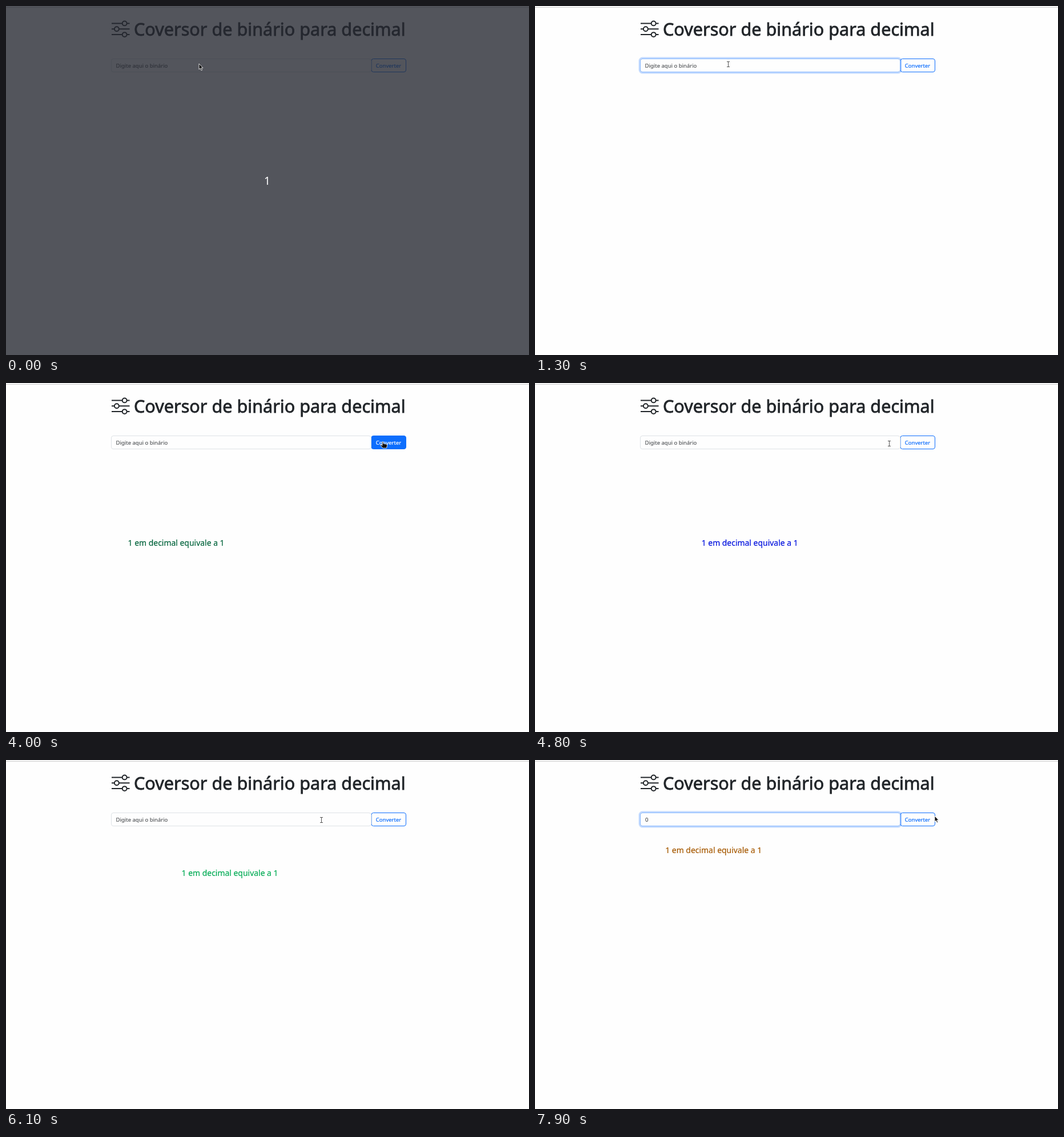
Recreate the animation shown at these times as an HTML page. Size 916 px wide and 611 px high, loop 8 s.

```html
<!DOCTYPE html>
<html lang="pt">
<head>
<meta charset="utf-8">
<title>Coversor</title>
<style>
  html, body { margin: 0; width: 100%; height: 100%; overflow: hidden; background: #fefefe; }
  svg { display: block; width: 916px; height: 611px; }
  text { font: 9.5px "Noto Sans", sans-serif; fill: #212529; stroke-width: .2px; }
  #heading { font-size: 30.6px; stroke: #212529; stroke-width: .8px; }
  #hint { fill: #595c5f; stroke: #595c5f; }
  #button { stroke: #0d6efd; }
  #result { font-size: 13.95px; }
  #count { font-size: 19px; fill: #fff; }
  .icon { fill: none; stroke: #212529; }
  .pointer { fill: #111; stroke: #fff; stroke-width: .8; stroke-linejoin: round; }
</style>
</head>
<body>
<svg viewBox="0 0 916 611">
  <rect width="916" height="611" fill="#fefefe"/>
  <rect width="916" height="2" fill="#f8f8f8"/>
  <rect y="2" width="916" height="1" fill="#d2d2d2"/>

  <g class="icon" transform="translate(185 23.5) scale(1.97)">
    <circle cx="11.5" cy="3.5" r="2"/>
    <circle cx="4.5" cy="8.5" r="2"/>
    <circle cx="11.5" cy="13.5" r="2"/>
    <path d="M0 3.5H9.5M13.5 3.5H16M0 8.5H2.5M6.5 8.5H16M0 13.5H9.5M13.5 13.5H16"/>
  </g>
  <text id="heading" x="224" y="52">Coversor de binário para decimal</text>

  <g id="button">
    <rect x="640" y="92.5" width="60.5" height="23" rx="3.5"/>
    <text x="670" y="107.6" text-anchor="middle">Converter</text>
  </g>

  <rect x="184.5" y="92.5" width="455" height="23" rx="3.5" fill="#fefefe" stroke="#dee2e6"/>
  <g id="focus" fill="none">
    <rect x="182.8" y="90.8" width="458.4" height="26.4" rx="5.2" stroke="#0d6efd" stroke-opacity=".25" stroke-width="2.4"/>
    <rect x="184.5" y="92.5" width="455" height="23" rx="3.5" stroke="#86b7fe"/>
  </g>
  <text id="hint" x="192.6" y="107.6">Digite aqui o binário</text>
  <text id="value" x="193" y="107.6"></text>
  <rect id="caret" y="98" width="1" height="12" fill="#212529"/>

  <text id="result">1 em decimal equivale a 1</text>

  <g id="overlay">
    <rect width="916" height="611" fill="#252831" fill-opacity=".79"/>
    <text id="count" x="457.5" y="312.5" text-anchor="middle">1</text>
  </g>

  <g id="cursor">
    <path id="arrow" class="pointer" d="M0 0V10L2.3 8L4 11.8L5.7 11L4 7.4H7Z"/>
    <path id="beam" d="M-2 -4.5H3M.5 -4.5V4.5M-2 4.5H3" fill="none" stroke="#555"/>
    <path id="hand" class="pointer" d="M-1 0Q0 -1 1 0V3L6.5 4.2Q8 5 7.5 7L6.5 11H0L-3.8 6.5Q-4 5 -2.5 5.2L-1 6.5Z"/>
  </g>
</svg>
<script>
const LOOP = 8000, STEP = 100;
const el = id => document.getElementById(id);
const show = (id, on) => el(id).setAttribute('visibility', on ? 'visible' : 'hidden');
const ramp = (t, from, to) => Math.min(1, Math.max(0, (t - from) / (to - from)));
const mix = (a, b, p) => a.map((v, i) => v + (b[i] - v) * p);
const within = (t, spans) => spans.some(([from, to]) => t >= from && t < to);

// time, x, y
const cursorPath = [
  [0, 338, 101], [100, 338, 102], [1900, 338, 102], [2200, 343, 103], [2600, 363, 111],
  [3000, 437, 128], [3300, 520, 140], [3700, 640, 112], [3900, 660, 103], [4400, 660, 103],
  [4800, 620, 106], [5700, 552, 105], [7000, 552, 105], [7200, 620, 122], [7500, 735, 122],
  [7800, 712, 100], [7900, 700, 98], [8000, 700, 98]
];
const caretSpans = [[700, 1300], [1900, 2400], [2500, 3100], [6400, 6900], [7100, 7700]];

// The result walks around a square and turns back at the top left: x, y, r, g, b
const topLeft = [186, 157, 255, 0, 0], topRight = [308, 157, 0, 255, 0];
const bottomRight = [308, 279, 0, 0, 255], bottomLeft = [186, 279, 0, 128, 0];
const corners = [bottomLeft, bottomRight, topRight, topLeft, topRight];
const SIDE = 1250, WALK_START = 3713;

function drawResult(t) {
  show('result', t >= 4000);
  if (t < 4000) return;
  const held = t >= 5800 && t < 6200 ? 5800 : t;
  const leg = (held - WALK_START) / SIDE, i = Math.floor(leg);
  const [x, y, ...rgb] = mix(corners[i], corners[i + 1], leg - i);
  const color = `rgb(${rgb.map(Math.round)})`;
  el('result').setAttribute('x', x - .4);
  el('result').setAttribute('y', y + 5.5);
  el('result').style.fill = el('result').style.stroke = color;
}

function drawField(t) {
  const value = within(t, [[2500, 4000]]) ? '1' : t >= 7100 ? '0' : '';
  el('value').textContent = value;
  show('hint', !value);
  show('caret', within(t, caretSpans));
  el('caret').setAttribute('x', value ? 198.5 : 193);
  el('focus').setAttribute('opacity', ramp(t, 600, 900) - ramp(t, 3700, 3900) + ramp(t, 6300, 6600));
}

function drawCursor(t) {
  const i = cursorPath.findIndex(([time]) => time > t);
  const a = cursorPath[i - 1], b = cursorPath[i];
  const [, x, y] = mix(a, b, ramp(t, a[0], b[0]));
  const inRow = t >= STEP && y > 92 && y < 116;
  const overField = inRow && x < 640, overButton = inRow && x >= 640 && x < 700;
  el('cursor').setAttribute('transform', `translate(${x} ${y})`);
  show('beam', overField);
  show('hand', overButton);
  show('arrow', !overField && !overButton);
  const [box, label] = el('button').children;
  box.style.fill = overButton ? '#0d6efd' : '#fefefe';
  label.style.fill = label.style.stroke = overButton ? '#fff' : '#0d6efd';
}

function draw() {
  const t = Math.floor(performance.now() % LOOP / STEP) * STEP;
  show('overlay', t < STEP);
  drawField(t);
  drawResult(t);
  drawCursor(t);
  requestAnimationFrame(draw);
}
draw();
</script>
</body>
</html>
```
